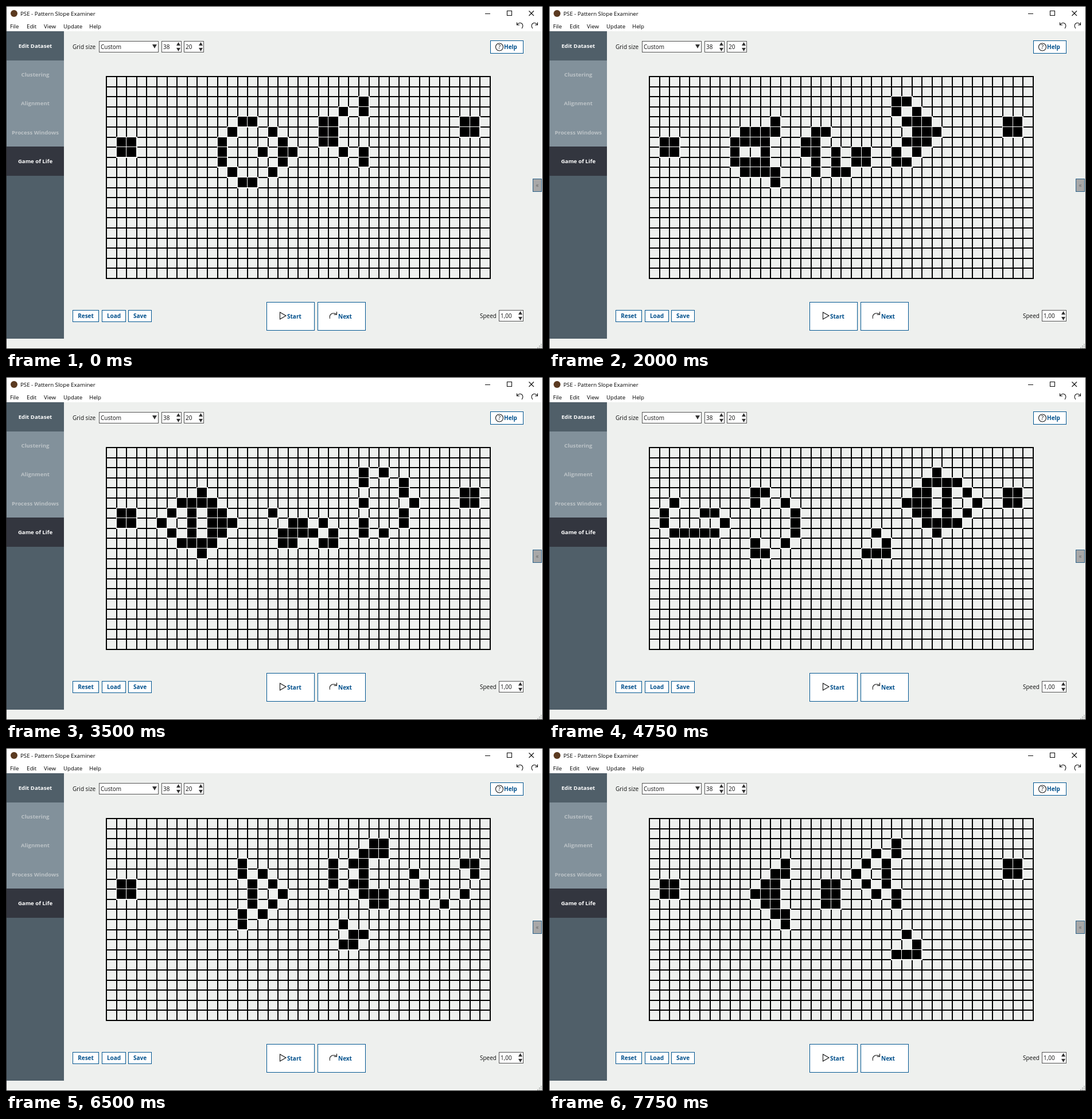
Recreate the animation shown at these times as an HTML page with a canvas. Size 936 by 598 pixels, loop 8 s.

```html
<!DOCTYPE html>
<html lang="en">
<head>
<meta charset="utf-8">
<title>Game of Life</title>
<style>
  html, body { margin: 0; width: 100%; height: 100%; overflow: hidden; background: #eef0ee; }
  svg, canvas { position: absolute; left: 0; top: 0; width: 936px; height: 598px; }
  text { font-family: "Open Sans", "Noto Sans", sans-serif; font-size: 10px; fill: #111; }
  .menu { font-size: 9.7px; fill: #000; }
  .nav { font-size: 9.6px; font-weight: 700; fill: #fff; text-anchor: middle; }
  .off { fill: #bcc3c7; }
  .btn { font-weight: 700; fill: #00508c; }
  .mid { text-anchor: middle; }
  .box { fill: #fff; stroke: #555; }
  .frame { fill: #fff; stroke: #005691; }
  .line { fill: none; stroke: #111; stroke-width: 1.1; }
</style>
</head>
<body>
<svg id="ui" viewBox="0 0 936 598">
  <rect width="936" height="598" fill="#eef0ee"/>
  <rect width="936" height="44" fill="#fff"/>
  <circle cx="14" cy="13" r="6" fill="#5b3a20"/>
  <text class="menu" x="25" y="17">PSE - Pattern Slope Examiner</text>
  <path class="line" d="M835 13.5H844M873.5 8.5h8v8h-8zM911.5 8.5l8.5 8.5M920 8.5l-8.5 8.5"/>
  <path class="line" d="M890.5 28.5v4.5h4.5M890.5 33c2-3.5 6-4.5 8.5-2.500s2.500 6 0 8.500M926.500 28.500v4.500h-4.500M926.500 33c-2-3.500-6-4.500-8.500-2.500s-2.500 6 0 8.500"/>

  <rect x="1" y="44" width="100" height="536" fill="#505f69"/>
  <rect x="1" y="95" width="100" height="150" fill="#82919b"/>
  <rect x="1" y="245" width="100" height="51" fill="#33363f"/>

  <text x="116" y="75">Grid size</text>
  <rect class="box" x="162.500" y="61.500" width="103" height="19"/>
  <text x="165" y="75">Custom</text>
  <path d="M255 67h8l-4 7z" fill="#333"/>

  <path class="line" d="M564.500 545c-1.500-7 4-11.500 11-8M576.500 533v5h-5"/>
</svg>
<canvas id="grid" width="936" height="598"></canvas>
<script>
const COLS = 38, ROWS = 20, CELL = 17.6, LEFT = 175, TOP = 123;
const STEP = 250, LOOP = 8000;

const ui = document.getElementById("ui");
const ctx = document.getElementById("grid").getContext("2d");

function add(tag, attrs, label) {
  const el = document.createElementNS("http://www.w3.org/2000/svg", tag);
  for (const key in attrs) el.setAttribute(key, attrs[key]);
  if (label) el.textContent = label;
  ui.append(el);
}

function text(cls, x, y, label) {
  add("text", { class: cls, x, y }, label);
}

function button(x, y, width, height, label, labelX) {
  add("rect", { class: "frame", x: x + .5, y: y + .5, width, height });
  text(labelX ? "btn" : "btn mid", labelX || x + width / 2 + .5, y + height / 2 + 4, label);
}

function spinner(x, y, width, label) {
  add("rect", { class: "box", x: x + .5, y: y + .5, width, height: 19 });
  text("", x + 3, y + 14, label);
  const ax = x + width - 8;
  add("path", { d: `M${ax} ${y + 8}h7l-3.5 -6zM${ax} ${y + 12}h7l-3.5 6z`, fill: "#333" });
}

function buildUi() {
  [["File", 7], ["Edit", 36], ["View", 66], ["Update", 100], ["Help", 145]]
    .forEach(([label, x]) => text("menu", x, 39, label));
  ["Edit Dataset", "Clustering", "Alignment", "Process Windows", "Game of Life"]
    .forEach((label, i) => text(i % 4 ? "nav off" : "nav", 51, 73 + i * 50.2, label));

  spinner(271, 61, 34, "38");
  spinner(310, 61, 34, "20");
  spinner(859, 530, 42, "1,00");
  text("", 826, 544, "Speed");

  button(844, 60, 57, 22, "Help", 868);
  add("circle", { class: "line", cx: 860, cy: 71.5, r: 6.5 });
  text("mid", 860, 75, "?");
  button(116, 530, 45, 20, "Reset");
  button(167, 530, 41, 20, "Load");
  button(213, 530, 40, 20, "Save");
  button(454, 516, 83, 49, "Start", 490);
  button(543, 516, 83, 49, "Next", 579);
  add("path", { class: "line", d: "M477.5 534v12l10.500-6z" });
  ui.append(ui.querySelector('path[d^="M564"]'));

  add("rect", { x: 918.5, y: 301.5, width: 15, height: 22, fill: "#a8a8a8", stroke: "#2b6289" });
  add("text", { class: "mid", x: 926, y: 316, style: "fill:#666" }, "«");
  for (let i = 0; i < 3; i++)
    for (let j = 0; j <= i; j++)
      add("rect", { x: 932 - j * 3, y: 589 + i * 3, width: 2, height: 2, fill: "#b8bab8" });
  add("rect", { x: .5, y: .5, width: 935, height: 597, fill: "none", stroke: "#222" });
}

// Glider gun: live columns for rows 2 to 10.
const GUN = [
  [25], [23, 25], [13, 14, 21, 22, 35, 36], [12, 16, 21, 22, 35, 36],
  [1, 2, 11, 17, 21, 22], [1, 2, 11, 15, 17, 18, 23, 25], [11, 17, 25],
  [12, 16], [13, 14]
];

function seed() {
  const cells = Array.from({ length: ROWS }, () => Array(COLS).fill(0));
  GUN.forEach((row, i) => row.forEach(c => cells[i + 2][c] = 1));
  return cells;
}

function next(cells) {
  return cells.map((row, r) => row.map((live, c) => {
    let n = -live;
    for (let y = r - 1; y <= r + 1; y++)
      for (let x = c - 1; x <= c + 1; x++)
        n += cells[y]?.[x] || 0;
    return +(n === 3 || (live && n === 2));
  }));
}

const gens = [seed()];
while (gens.length < LOOP / STEP) gens.push(next(gens[gens.length - 1]));

const px = c => Math.round(LEFT + c * CELL);
const py = r => Math.round(TOP + r * CELL);

function draw(cells) {
  ctx.clearRect(0, 0, 936, 598);
  ctx.fillStyle = "#000";
  for (let c = 0; c <= COLS; c++) ctx.fillRect(px(c) - 1, TOP - 1, 2, py(ROWS) - TOP + 2);
  for (let r = 0; r <= ROWS; r++) ctx.fillRect(LEFT - 1, py(r) - 1, px(COLS) - LEFT + 2, 2);

  const fillLive = (color, before, after) => {
    ctx.fillStyle = color;
    cells.forEach((row, r) => row.forEach((live, c) => {
      if (!live) return;
      const x = px(c) - before, y = py(r) - before;
      ctx.fillRect(x, y, px(c + 1) + after - x, py(r + 1) + after - y);
    }));
  };
  fillLive("#f4f5f4", 1, 1);
  fillLive("#000", 0, -1);
}

let shown = -1;
let start;
function tick(now) {
  start ??= now;
  const gen = Math.floor((now - start) % LOOP / STEP);
  if (gen !== shown) draw(gens[shown = gen]);
  requestAnimationFrame(tick);
}

buildUi();
draw(gens[0]);
requestAnimationFrame(tick);
</script>
</body>
</html>
```
